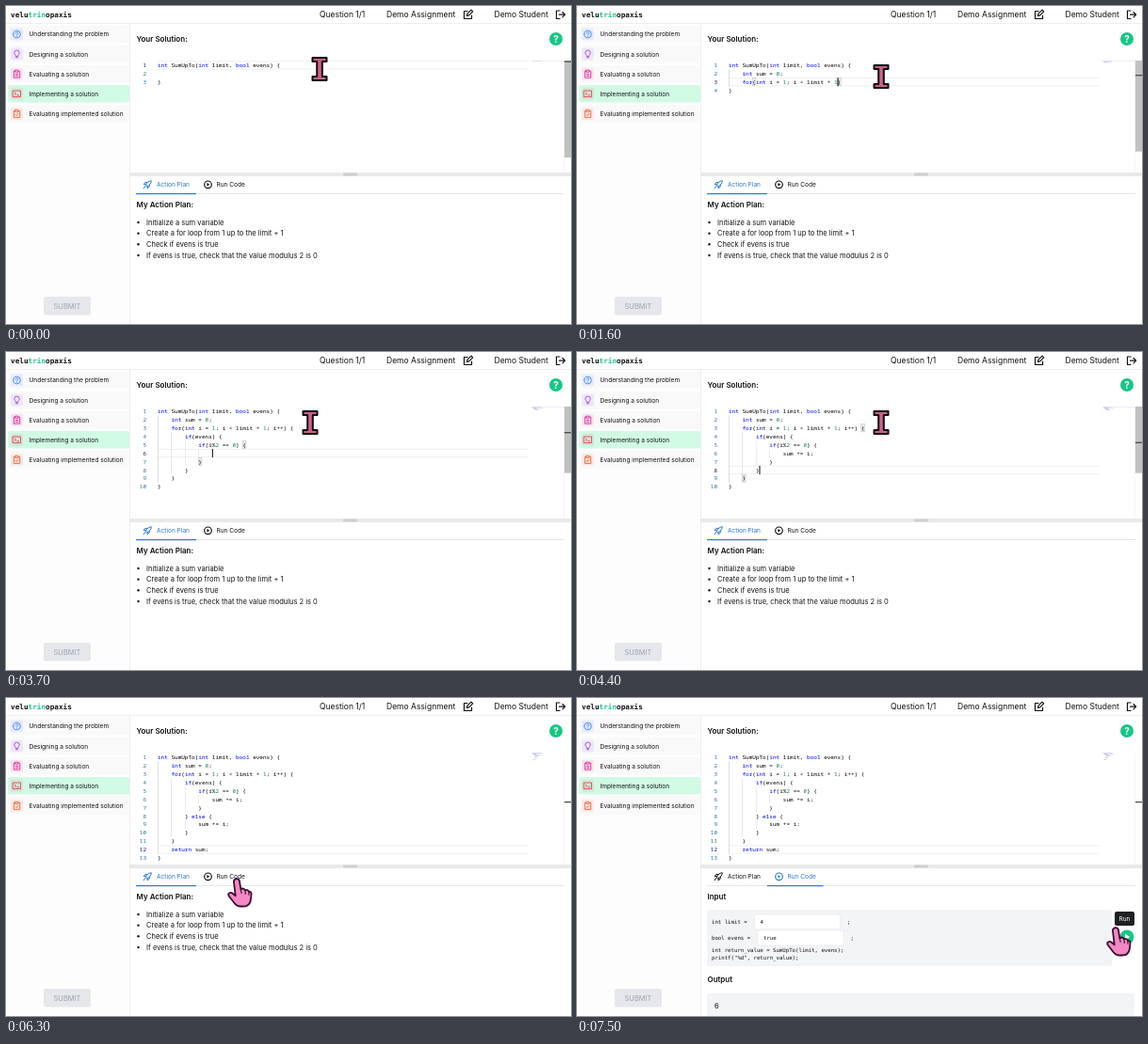
An HTML page that plays this animation: 600x338 px, repeating every 7600 ms.

```html
<!DOCTYPE html>
<html lang="en">
<head>
<meta charset="utf-8">
<title>Code exercise</title>
<style>
  html, body { margin: 0; width: 100%; height: 100%; overflow: hidden; background: #fff; }
  svg { display: block; width: 100%; height: 100%; font-family: Inter, Roboto, sans-serif; fill: #111; }
  text { white-space: pre; }
  .head { font-size: 8.5px; }
  .title { font-size: 8px; font-weight: 600; }
  .small { font-size: 6.56px; }
  .body { font-size: 7.5px; }
  .code { font: 6.02px "Noto Sans Mono", "DejaVu Sans Mono", monospace; }
  .form { font: 5.7px "DejaVu Sans Mono", monospace; }
  .brand { font: bold 7.7px "DejaVu Sans Mono", monospace; }
  .line { fill: none; stroke: currentColor; stroke-linecap: round; stroke-linejoin: round; }
</style>
</head>
<body>
<svg viewBox="0 0 600 338">
  <rect width="600" height="338" fill="#fff"/>
  <rect y="18" width="131" height="320" fill="#fdfdfd"/>
  <path d="M0 18.5H600M131.5 18V338" stroke="#eee" fill="none"/>

  <text class="brand" x="5" y="11.5">velu<tspan fill="#22c48b">trin</tspan>opaxis</text>
  <g class="head">
    <text x="333" y="12">Question 1/1</text>
    <text x="404" y="12">Demo Assignment</text>
    <text x="518.5" y="12">Demo Student</text>
  </g>
  <g class="line" color="#111" stroke-width="1.2">
    <path d="M490 5.5h-3.500v8h8v-3.500M489.500 10.500l.5-2.300 4-4 1.700 1.700-4 4z"/>
    <path d="M588 5h-3.500v8.500h3.500M587.500 9.200h6M591 6.500l2.700 2.700-2.700 2.700"/>
  </g>

  <g id="steps"></g>
  <rect x="40" y="309" width="50" height="19.500" rx="2" fill="#e5e7eb"/>
  <text class="body" x="65" y="321.600" text-anchor="middle" fill="#9ca3af">SUBMIT</text>

  <text class="title" x="138.500" y="37.700">Your Solution:</text>
  <circle cx="584" cy="35" r="7" fill="#16c784"/>
  <text x="584" y="38.600" font-size="10" font-weight="700" text-anchor="middle" fill="#fff">?</text>

  <g id="editor"></g>

  <rect x="131" y="177" width="469" height="4" fill="#e9e9e9"/>
  <rect x="358" y="177.500" width="15" height="3" rx="1" fill="#cfcfcf"/>
  <path d="M138 199.500H593" stroke="#e5e7eb"/>
  <g id="tabPlan">
    <path class="line" d="M148.500 190.500c1-3 3-4.500 5.800-4.700-.1 2.800-1.600 4.800-4.600 5.900zM148.500 189.300l-2.300.4 1.500-2.200 2.200-.1M150.300 191.500l-.3 2.300 2.100-1.500.3-2.300M147.700 191.500l-1.500 2.300"/>
    <text class="small" x="160" y="192.400" fill="currentColor">Action Plan</text>
    <rect x="138" y="199" width="64" height="1.200" fill="currentColor"/>
  </g>
  <g id="tabRun">
    <circle class="line" cx="214.500" cy="189.800" r="3.800" stroke-width="1.200"/>
    <path d="M213.400 188l2.900 1.800-2.900 1.800z" fill="currentColor"/>
    <text class="small" x="223.500" y="192.400" fill="currentColor">Run Code</text>
    <rect x="202" y="199" width="59.500" height="1.200" fill="currentColor"/>
  </g>

  <g id="plan">
    <text class="title" x="138.500" y="213.700">My Action Plan:</text>
  </g>

  <g id="run">
    <text class="title" x="138.500" y="213.900">Input</text>
    <rect x="138" y="225" width="430" height="60" rx="2" fill="#f3f4f6"/>
    <g fill="#fff" stroke="#e5e7eb" stroke-width=".7">
      <rect x="188.500" y="230" width="91" height="16" rx="2"/>
      <rect x="191.500" y="247" width="91.500" height="16" rx="2"/>
    </g>
    <g class="form">
      <text x="143" y="240">int limit =</text>
      <text id="limit" x="194.500" y="240"></text>
      <text x="287" y="240">;</text>
      <text x="143" y="257">bool evens =</text>
      <text id="evens" x="198" y="257"></text>
      <text x="290.500" y="257">;</text>
      <text x="143" y="269.800">int return_value = SumUpTo(limit, evens);</text>
      <text x="143" y="278.200">printf("%d", return_value);</text>
    </g>
    <circle cx="584" cy="254" r="7.500" fill="#16c784"/>
    <path d="M582 250.500l5 3.500-5 3.500z" fill="#fff"/>
    <text class="title" x="138.500" y="302.400">Output</text>
    <rect x="138" y="314" width="454" height="24" rx="2" fill="#f3f4f6"/>
    <text id="output" class="body" x="146" y="329.700">6</text>
    <g id="tip">
      <rect x="571" y="227" width="21" height="15" rx="2" fill="#1f2023"/>
      <text class="small" x="581.500" y="236.900" text-anchor="middle" fill="#fff">Run</text>
    </g>
  </g>

  <path id="beam" fill="#c9628a" stroke="#120a0e" stroke-width="2" stroke-linejoin="round"
    d="M-7.500-12H7.500V-8H2.800V8H7.500V12H-7.500V8H-2.800V-8H-7.500z"/>
  <g id="hand" stroke="#3a1130" stroke-width="1.800" stroke-linejoin="round" stroke-linecap="round">
    <path fill="#f587c5" d="M-3 4C-3.800-.5 2.300-1.200 3 3L4.400 11.500C6 9.800 8.500 10.500 9 12.500C10.800 11.300 12.800 12.300 13 14.300C14.500 13.500 15.800 14.700 15.500 17L14.800 23C14 27.500 11.500 29.500 7 29.500H3.500C0 29.500-2 27-4 24L-8.300 18.500C-10 15.500-6.500 13.500-4 16L-1.300 18.200z"/>
    <path fill="none" stroke-width="1.100" d="M4.400 11.500l.7 4M9 12.500l.3 4M13 14.300l-.1 3"/>
  </g>
</svg>
<script>
const $ = id => document.getElementById(id);
const LOOP = 7600, STEP = 100;
const CW = 3.612, LH = 8.92, LEFT = 161, TOP = 58.5, VIEW = 118.5;

const rect = (x, y, w, h, fill, extra = '') =>
  `<rect x="${x}" y="${y}" width="${w}" height="${h}" fill="${fill}" ${extra}/>`;
const escapeText = s => s.replace(/&/g, '&amp;').replace(/</g, '&lt;');

// Sidebar and plan
const clipboard = 'M-2-3h-1.200v7h6.400v-7h-1.200M-1.500-4h3v2h-3z';
const steps = [
  ['Understanding the problem', '#3b82f6', 'M-3.800 0a3.800 3.800 0 1 0 7.600 0a3.800 3.800 0 1 0-7.600 0M-1.200-1c0-1.700 2.500-1.600 2.400 0c0 .9-1.200.8-1.200 1.700M0 2.100v.1'],
  ['Designing a solution', '#a044e0', 'M-1.200 2c0-1.200-1.500-1.700-1.500-3.300a2.700 2.700 0 0 1 5.400 0c0 1.600-1.500 2.100-1.500 3.300zM-1 3.700h2'],
  ['Evaluating a solution', '#e0289a', clipboard + 'M-1.300 .2h2.600M-1.300 2h2.600'],
  ['Implementing a solution', '#ef3d4f', 'M-4-3.300h8v6.600h-8zM-2.300-1.200l1.400 1.200-1.400 1.200M.3 1.500h1.800'],
  ['Evaluating implemented solution', '#f0642e', clipboard + 'M-1.500 1l1.100 1.100 2-2.200'],
];
$('steps').innerHTML = steps.map(([label, color, icon], i) => {
  const y = 30 + i * 21.1, active = i === 3;
  return rect(2, y - 9.3, 129, 18.6, active ? '#d1fae5' : '#f9f9fa', 'rx="2"') +
    rect(5, y - 6.5, 13, 13, color, 'rx="2" opacity=".1"') +
    `<path class="line" color="${color}" stroke-width=".9" transform="translate(11.500 ${y})" d="${icon}"/>` +
    `<text class="small" x="24.500" y="${y + 2.4}">${label}</text>`;
}).join('');

$('plan').innerHTML += [
  'Initialize a sum variable',
  'Create a for loop from 1 up to the limit + 1',
  'Check if evens is true',
  'If evens is true, check that the value modulus 2 is 0',
].map((s, i) => {
  const y = 230 + i * 11.65;
  return `<circle cx="140.500" cy="${y}" r="1.200"/><text class="body" x="149" y="${y + 2.7}">${s}</text>`;
}).join('');

// Keystrokes, spread evenly from one step to another; ↓ goes to the end of the next line
const START = 'int SumUpTo(int limit, bool evens) {\n\n}';
const typing = [
  [0, 1, '↓'],
  [2, 7, '\tint sum = 0;\n'],
  [7, 16, 'for(int i = 1; i < limit + 1'],
  [16, 22, '; i++) {\n'],
  [22, 28, 'if(evens) '],
  [28, 37, '{\nif(i%2 == 0) {\n'],
  [37, 42, 'sum += i;'],
  [42, 44, '↓↓'],
  [44, 47, ' else {\n'],
  [47, 51, 'sum += i;'],
  [51, 53, '↓↓'],
  [53, 58, '\nreturn sum;'],
];

function press({ text, pos }, key) {
  const before = text.slice(0, pos), after = text.slice(pos);
  const insert = (s, tail = '') => ({ text: before + s + tail + after, pos: pos + s.length });
  if (key === '↓') {
    const next = text.indexOf('\n', pos) + 1, end = text.indexOf('\n', next);
    return { text, pos: end < 0 ? text.length : end };
  }
  if (key === '\t') return insert('    ');
  if (key === '(') return insert('(', ')');
  if (key === '{') return insert('{', '}');
  if (key === ')' && after[0] === ')') return { text, pos: pos + 1 };
  if (key === '\n') {
    const indent = before.split('\n').pop().match(/^ */)[0];
    return before.endsWith('{') ? insert('\n    ' + indent, '\n' + indent) : insert('\n' + indent);
  }
  return insert(key);
}

function documentAt(step) {
  let doc = { text: START, pos: START.indexOf('\n') };
  for (const [from, to, keys] of typing) {
    const part = Math.min(1, Math.max(0, (step - from) / (to - from)));
    for (const key of keys.slice(0, Math.round(part * keys.length))) doc = press(doc, key);
  }
  return doc;
}

// Innermost pair of brackets around the caret
function enclosing(text, pos) {
  let depth = 0, open = pos - 1, close = pos;
  for (; open >= 0; open--) {
    if (')}'.includes(text[open])) depth++;
    else if ('({'.includes(text[open]) && depth-- === 0) break;
  }
  if (open < 0) return [];
  for (depth = 0; close < text.length; close++) {
    if ('({'.includes(text[close])) depth++;
    else if (')}'.includes(text[close]) && depth-- === 0) break;
  }
  return [open, close];
}

function place(text, pos) {
  const rows = text.slice(0, pos).split('\n');
  return { row: rows.length - 1, x: LEFT + rows.pop().length * CW };
}

function codeLine(line, y) {
  const tokens = line.matchAll(/\b(?:int|bool|for|if|else|return)\b|\d+|[a-zA-Z]+|[^\sa-zA-Z\d]+/g);
  return [...tokens].map(({ 0: s, index }) => {
    const fill = /^\d/.test(s) ? '#098658' : /^(int|bool|for|if|else|return)$/.test(s) ? '#0000ff' : '#000';
    return `<text class="code" x="${LEFT + index * CW}" y="${y}" fill="${fill}">${escapeText(s)}</text>`;
  }).join('');
}

function drawEditor(step) {
  const { text, pos } = documentAt(step);
  const lines = text.split('\n'), caret = place(text, pos);
  const scale = VIEW / (VIEW + (lines.length - 1) * LH);
  const rowTop = row => TOP + row * LH;
  const focused = step >= 1 && step < 61;
  let out = `<path d="M${LEFT} ${rowTop(caret.row) + .3}H555M${LEFT} ${rowTop(caret.row + 1) - .3}H555" stroke="#e8e8e8" stroke-width=".7"/>`;

  lines.forEach((line, row) => {
    const y = rowTop(row), isBlank = !line.trim();
    const indent = isBlank ? line.length : line.match(/^ */)[0].length;
    for (let col = 0; col < indent; col += 4)
      out += rect(LEFT + col * CW, y, .5, LH, col ? '#d3d3d3' : '#bdbdbd');
    out += `<text class="code" x="149" y="${y + 6.6}" text-anchor="end" fill="${row === caret.row ? '#0b216f' : '#237893'}">${row + 1}</text>`;
    if (!isBlank)
      out += rect(558.5 + indent * .28, TOP + row * .62, (line.length - indent) * .28, .42, '#7c80c4', 'opacity=".7"');
  });

  if (focused) for (const p of enclosing(text, pos)) {
    const { row, x } = place(text, p);
    out += rect(x, rowTop(row) + .4, CW, LH - .8, '#eeeeee', 'stroke="#b9b9b9" stroke-width=".5"');
  }
  lines.forEach((line, row) => { out += codeLine(line, rowTop(row) + 6.6); });
  if (focused) out += rect(caret.x, rowTop(caret.row), 1, LH, '#000');

  out += rect(592, 58, .5, 119, '#e8e8e8');
  if (step < 60) out += rect(558, 58, 35, .6, '#dfe3f2') + rect(593, 58, 7, VIEW * scale, '#c1c1c1');
  out += rect(593, TOP + caret.row * LH * scale, 7, 1.2, '#424242');
  $('editor').innerHTML = out;
}

// Pointer stops: step, x, y, shape
const pointer = [
  [0, 333, 67, 'beam'], [1, 323, 75, 'beam'], [58, 323, 75, 'beam'],
  [60, 268, 180, 'beam'], [61, 268, 180, 'beam'], [62, 250, 190, 'hand'],
  [63, 245, 192, 'hand'], [64, 245, 192, 'hand'], [66, 222, 238, 'beam'],
  [67, 222, 238, 'beam'], [68, 228, 255, 'beam'], [70, 228, 255, 'beam'],
  [73, 572, 244, 'hand'], [76, 572, 244, 'hand'],
];

function drawPointer(step) {
  const i = pointer.findLastIndex(p => p[0] <= step);
  const a = pointer[i], b = pointer[i + 1] || a;
  const k = b === a ? 0 : (step - a[0]) / (b[0] - a[0]);
  for (const shape of ['beam', 'hand']) {
    show(shape, a[3] === shape);
    $(shape).setAttribute('transform', `translate(${a[1] + (b[1] - a[1]) * k} ${a[2] + (b[2] - a[2]) * k})`);
  }
}

function show(id, on) { $(id).style.display = on ? '' : 'none'; }

function setTab(id, active) {
  $(id).style.color = active ? '#2b78d0' : '#111';
  $(id).querySelector('rect').style.display = active ? '' : 'none';
}

function render(step) {
  const running = step >= 65;
  drawEditor(step);
  setTab('tabPlan', !running);
  setTab('tabRun', running);
  show('plan', !running);
  show('run', running);
  $('limit').textContent = step >= 67 ? '4' : '';
  $('evens').textContent = 'true'.slice(0, Math.max(0, (step - 68) * 2));
  show('tip', step >= 73);
  show('output', step >= 75);
  drawPointer(step);
}

let shown = -1;
function tick() {
  const step = Math.floor(performance.now() % LOOP / STEP);
  if (step !== shown) render(shown = step);
  requestAnimationFrame(tick);
}
tick();
</script>
</body>
</html>
```
